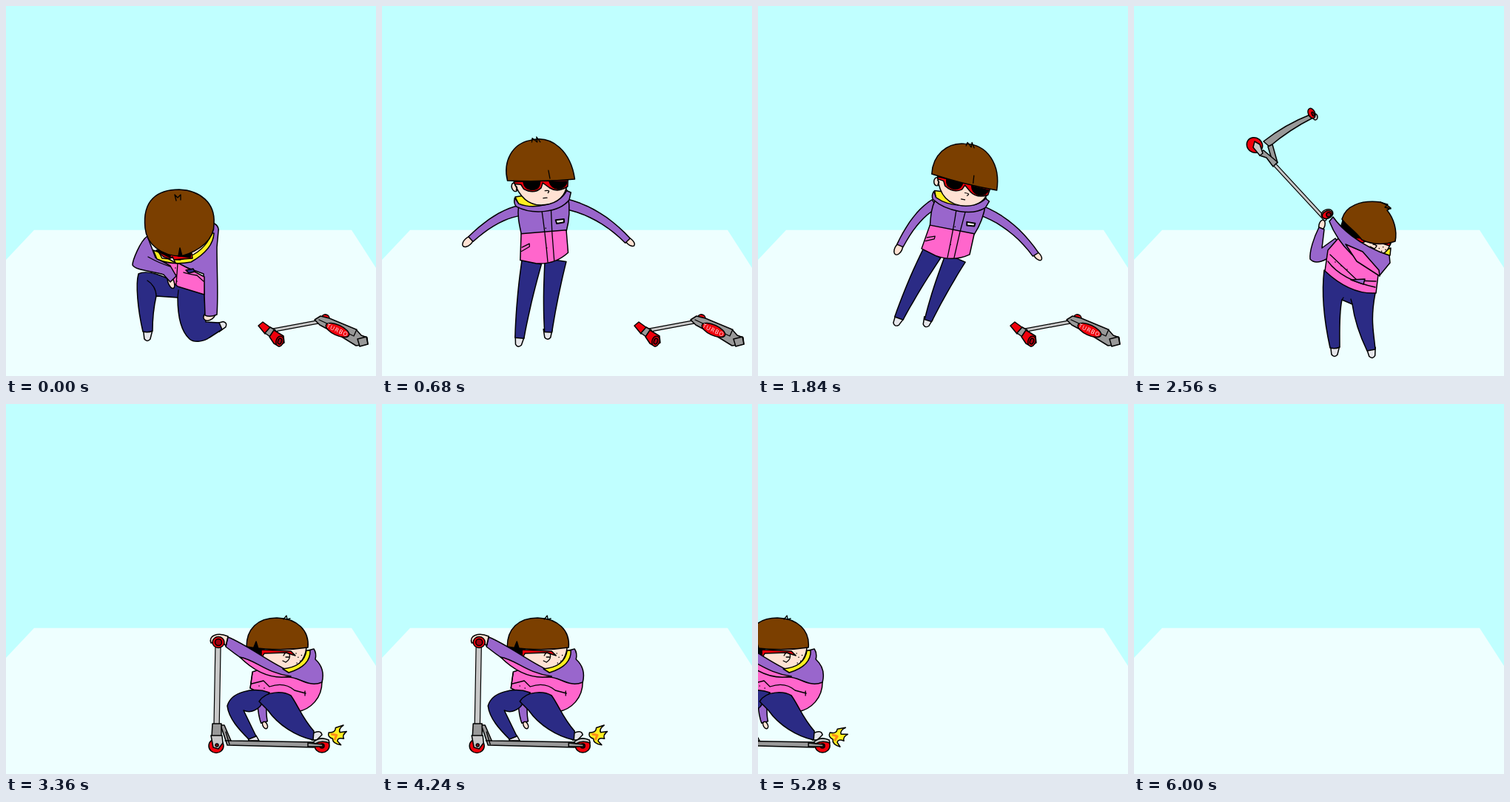
An HTML page for the animation above (6.04 s loop, 500 by 500 pixels).

```html
<!DOCTYPE html>
<html lang="en">
<head>
<meta charset="utf-8">
<style>
html, body { margin: 0; width: 100%; height: 100%; overflow: hidden; background: #c0ffff; }
svg { display: block; width: 100vw; height: 100vh; }
.ink { stroke: #000; stroke-width: 1.5; stroke-linejoin: round; stroke-linecap: round; }
</style>
</head>
<body>
<svg id="stage" viewBox="0 0 500 500"></svg>
<script>
const LOOP = 6040;
const C = {
  hair: '#7b3f00', skin: '#ffe2d3', purple: '#9966cc', pink: '#ff66cc', navy: '#2b2b85', red: '#f0000c',
  dark: '#a00010', grey: '#999', light: '#c8c8c8', shoe: '#e6e6ea', yellow: '#ffef20', black: '#000', orange: '#ff8c18'
};

const shape = (color, d) => `<path fill="${C[color]}" d="${d}"/>`;
const line = (d, color = 'black', width = 1.3) =>
  `<path fill="none" stroke="${C[color]}" stroke-width="${width}" d="${d}"/>`;
const tube = (d, color, width) => line(d, 'black', width + 2.4) + line(d, color, width);
const oval = (color, x, y, rx, ry = rx, turn = 0) =>
  `<ellipse fill="${C[color]}" cx="${x}" cy="${y}" rx="${rx}" ry="${ry}" transform="rotate(${turn} ${x} ${y})"/>`;
const group = (id, ...parts) => `<g id="${id}">${parts.join('')}</g>`;
const shoe = (x, y, turn) =>
  `<g transform="translate(${x} ${y}) rotate(${turn})">${shape('shoe', 'M-6 -2H6L4 9Q0 14 -4 9Z')}</g>`;
const dot = (x, y) => `<circle cx="${x}" cy="${y}" r=".8" stroke="none"/>`;
const range = n => [...Array(n).keys()];

// Tapered limb along a quadratic curve.
function limb(color, [x0, y0], [x1, y1], [x2, y2], startWidth, endWidth) {
  const sides = [[], []];
  for (const i of range(11)) {
    const k = i / 10, u = 1 - k;
    const x = u * u * x0 + 2 * u * k * x1 + k * k * x2;
    const y = u * u * y0 + 2 * u * k * y1 + k * k * y2;
    const dx = u * (x1 - x0) + k * (x2 - x1), dy = u * (y1 - y0) + k * (y2 - y1);
    const half = (startWidth + (endWidth - startWidth) * k) / 2 / Math.hypot(dx, dy);
    sides[0].push([x - dy * half, y + dx * half]);
    sides[1].unshift([x + dy * half, y - dx * half]);
  }
  return shape(color, 'M' + sides.flat().map(p => p.map(v => v.toFixed(1)).join(' ')).join('L') + 'Z');
}
const buttons = (n, x, y, dx, dy) => range(n).map(i => dot(x + i * dx, y + i * dy)).join('');
const freckles = (x, y, w, h) => range(6).map(i => dot(x + w * (i * 0.618 % 1), y + h * i / 5)).join('');

const lying = group('lying',
  oval('red', 432, 421, 5, 4, 20),
  tube('M362 438L421 427', 'light', 3),
  shape('grey', 'M417 424L425 419 437 422 473 437 480 445 488 448 489 457 473 459 452 446 424 431Z'),
  shape('grey', 'M475 450L487 447 489 457 478 460Z'),
  line('M423 424L470 446 474 437'),
  oval('red', 448, 438, 17, 7, 25),
  '<text x="448" y="441" transform="rotate(25 448 438)" fill="#fff" stroke="none" text-anchor="middle" ' +
    'font-family="Open Sans, sans-serif" font-size="8" letter-spacing="1">TURBO</text>',
  shape('red', 'M341 432L347 427 358 435 350 443Z'),
  shape('grey', 'M350 442L357 434 364 438 357 447Z'),
  shape('red', 'M356 447L362 438 375 446 376 455 369 460 362 456Z'),
  oval('red', 370, 453, 5, 7, 18), oval('dark', 370, 453, 2.5, 4, 18));

const kneel = group('kneel',
  shoe(191.5, 441, 4), shoe(287, 434, -115),
  shape('navy', 'M179 362C175 376 178 410 185 440Q192 442 198 439C198 420 200 405 203 392L232 394C232 420 237 440 248 450C255 456 268 453 275 448L292 437 288 428 270 427 268 388 230 376C215 364 190 356 179 362Z'),
  line('M203 392C203 383 198 375 191 371M232 394L233 384'),
  group('kneelTop',
    oval('skin', 275, 418, 9, 6, -35),
    shape('purple', 'M274 293C283 291 288 299 287 304L285 326C285 360 287 390 285 417Q276 421 269 418L267 362 232 349 236 330Z'),
    shape('pink', 'M207 345L234 348 268 366 268 390 232 379 222 370Z'),
    line('M267 372L258 364Q247 362 240 360M232 348L230 376'),
    shape('navy', 'M243 357L253 355 255 359 247 361Z'),
    buttons(3, 229, 354, 1, 9),
    oval('skin', 223, 373, 4, 9, -20),
    shape('purple', 'M191 311C181 318 171 344 171 350C174 357 197 358 213 363L222 373 230 365 222 351 202 340Z'),
    line('M192 339Q208 348 222 352'),
    shape('yellow', 'M199 330L204 342Q225 351 250 346Q280 329 281 307L274 307Q262 334 230 341Z'),
    shape('skin', 'M205 330L211 341 235 343Q263 336 275 314Z'),
    shape('red', 'M203 330L213 339 225 343 252 341 251 334Z'),
    shape('black', 'M204 331L222 340 222 334ZM229 337L249 340 250 333Z'),
    shape('skin', 'M220 342L225 339 229 347Z'),
    shape('hair', 'M188 300C184 262 205 248 234 248C262 249 283 266 281 294C282 315 262 331 237 338C210 338 190 322 188 300Z'),
    shape('black', 'M235 327L238 338 233 338Z'),
    line('M230 263L228 255 232 259 236 255 236 262')));

const stand = group('stand',
  group('armL', oval('skin', 106, 322, 5, 9, 5), limb('purple', [130, 244], [111, 268], [106.5, 317], 14, 9)),
  group('armR', oval('skin', 168, 348, 4, 8, 25), limb('purple', [193, 250], [196, 298], [168.5, 345], 14, 9)),
  shoe(83, 410, 25), shoe(122.5, 411, 18),
  limb('navy', [127, 316], [101, 365], [83, 410], 27, 12),
  limb('navy', [159, 322], [137, 370], [122.5, 413], 29, 10),
  shape('purple', 'M131 238C125 252 125 264 124 277L184 288Q196 268 199 244Z'),
  shape('pink', 'M124 275L184 287 178 317Q156 328 132 319L113 309Z'),
  line('M160 249Q156 280 148 322M173 250Q164 285 157 322M118 298L130 295 131 291 120 293'),
  buttons(3, 164, 251, -6, 26),
  '<path fill="#fff" stroke-width="2" d="M174 270L185 272 184 276 174 275Z"/>',
  shape('yellow', 'M130 225L132 237 150 247 188 248 201 239 199 234Z'),
  shape('purple', 'M129 226Q125 233 128 238C146 255 181 262 199 249L204 240 199 236C187 250 151 250 132 235Z'),
  oval('skin', 133, 212, 4, 6),
  shape('skin', 'M134 205C136 232 148 246 172 247C190 247 200 237 204 222Z'),
  shape('red', 'M134 205L205 222 202 231Q187 236 178 226L171 217 167 223Q155 229 144 218L142 211 134 208Z'),
  shape('black', 'M146 209L168 214Q165 225 154 222Q145 219 146 209ZM180 218L203 224Q200 232 189 231Q180 227 180 218Z'),
  line('M171 228Q179 229 174 232M166 237L171 238M134 210Q138 213 134 216'),
  shape('hair', 'M126 201C127 174 146 155 170 157C202 157 219 188 214 224Q170 216 126 201Z'),
  line('M182 214L183 203M172 160L174 155 179 162 180 155 183 163'));

const raised = group('raised',
  shoe(271.5, 462, 4), shoe(320.5, 464, -8),
  shape('navy', 'M257 357C253 390 258 430 265 462Q272 464 278 461C278 440 277 415 281 397L295 403C298 425 305 445 315 466L326 464C324 440 319 425 326 388Z'),
  line('M281 397L283 394M295 403L293 396'),
  group('raisedTop',
    oval('skin', 254, 296, 4, 7, 15),
    shape('purple', 'M250 299C243 313 237 331 238 342Q245 350 260 342L278 322 272 314 254 327 257 302Z'),
    shape('pink', 'M262 330L276 314 331 355 327 388Q292 390 258 358Z'),
    line('M262 345Q280 370 326 380M265 336L302 371 327 372'),
    shape('purple', 'M293 370L312 369 310 376Z'),
    buttons(3, 272, 346, 8, 5),
    shape('yellow', 'M331 334L347 327 346 337 337 341Z'),
    shape('skin', 'M288 296L300 317 327 337Q342 337 347 320Z'),
    shape('black', 'M283 287L279 300 297 316 311 314 318 306Z'),
    shape('red', 'M286 302L295 313 312 314 316 308 347 321 345 324 318 315 309 320 295 317 284 306Z'),
    shape('hair', 'M281 288C286 270 306 262 333 265L342 269 347 273 342 276C351 287 356 303 353 318Q329 326 308 316C297 302 288 298 281 288Z'),
    line('M333 265L343 268 339 272 347 274M323 322Q331 323 325 328L319 325'),
    freckles(328, 324, 14, 9),
    shape('purple', 'M269 285C278 298 302 323 345 337L346 347 332 364C306 348 278 327 264 291Z'),
    shape('pink', 'M286 322L309 332 331 357 332 365 301 345Z'),
    group('swing',
      tube('M186 210L258 288', 'light', 3),
      oval('red', 163, 188, 11, 10, 35),
      shape('grey', 'M175 183Q204 160 240 146L242 151Q210 167 183 190Z'),
      shape('grey', 'M181 190L187 187 194 212 188 213Z'),
      shape('grey', 'M169 198L175 195 194 211 188 217 179 205 170 202Z'),
      shape('light', 'M163 183L170 187 174 199 170 202 161 191Z'),
      oval('light', 245, 150, 3, 4), oval('red', 240, 145, 4.5, 7, -25), oval('dark', 242, 146, 1.5, 3, -25)),
    oval('skin', 261, 281, 8, 6, -20),
    oval('red', 261, 282, 7, 5, -25), oval('dark', 263, 282, 3)));

const ride = group('ride',
  limb('purple', [346, 404], [346, 420], [349, 430], 12, 9),
  oval('skin', 350, 434, 3, 5, -25),
  shape('shoe', 'M327 450L338 448 342 455 328 455Z'),
  shape('shoe', 'M413 446Q425 439 427 447L420 454 413 454Z'),
  oval('red', 284, 462, 10, 9.5),
  shape('grey', 'M290 434L295 434 304 455 416 457 416 464 299 461Z'),
  line('M296 455L304 455M297 443L302 460'),
  oval('red', 427, 461.5, 10, 9.5), oval('dark', 427, 462, 3),
  shape('grey', 'M408 458L428 460 428 463 408 463Z'),
  shape('light', 'M415 457Q424 449 436 454L437 458Q426 454 418 459Z'),
  tube('M286.5 328L284.5 438', 'light', 6),
  shape('grey', 'M279 432L291 432 291 450 278 450Z'),
  shape('light', 'M277 448L292 448 293 458 287 466 280 464Z'),
  oval('dark', 285, 461, 2),
  shape('pink', 'M333 362L355 355 427 375C427 398 412 412 394 416L330 384Z'),
  shape('navy', 'M299 408C304 389 334 382 356 390L343 409Q332 419 321 414L338 449 328 453C315 440 301 425 299 408Z'),
  shape('navy', 'M342 402C351 387 375 388 385 394C395 408 400 424 416 442L415 454C392 449 368 434 354 414Z'),
  line('M332 378L348 374 356 382Q376 375 390 387L405 391M404 388V394M333 364L330 384'),
  buttons(2, 342, 381, 7, 3),
  shape('skin', 'M343 329L347 347Q362 358 378 358Q403 355 406 329Z'),
  shape('black', 'M327 328L349 330 347 339 341 344 329 340Z'),
  shape('red', 'M345 332L385 334 391 340 378 336 349 337 345 344Z'),
  line('M375 340Q378 333 383 338Q385 345 378 349L374 347M378 342L382 342'),
  freckles(392, 337, 12, 13),
  shape('hair', 'M325 328C325 304 340 289 366 289C394 290 410 306 408 329Q369 335 325 328Z'),
  shape('black', 'M334 331L338 321 341 331Z'),
  line('M375 291L379 286 380 291 384 290'),
  shape('purple', 'M300 315C325 325 355 348 377 358C396 360 410 348 408 333L416 331Q420 337 418 345C428 354 430 364 427 376C408 384 396 368 380 369C352 368 325 350 297 328Z'),
  shape('pink', 'M316 342C338 346 350 363 385 368C358 373 336 362 316 342Z'),
  shape('yellow', 'M406 333L411 333Q412 354 382 363L374 358Q403 355 406 333Z'),
  shape('skin', 'M277 323C273 313 286 308 300 314L297 327 292 320Z'),
  oval('red', 287, 322, 8, 7.5), oval('dark', 287, 322, 4.5),
  group('flame',
    shape('yellow', 'M437 444Q446 446 447 439L458 437Q450 441 452 446L461 446Q454 450 456 455Q448 452 447 457L451 463Q440 460 441 453Q434 450 437 444Z'),
    line('M441 447L447 449 444 454', 'orange', 3)));

const stage = document.getElementById('stage');
stage.innerHTML = '<path fill="#c0ffff" d="M0 0H500V500H0Z"/><path fill="#eeffff" d="M0 343L38 302.7H467L500 354V500H0Z"/>' +
  `<g class="ink">${lying}${kneel}${stand}${raised}${ride}</g>`;
const el = Object.fromEntries([...stage.querySelectorAll('[id]')].map(node => [node.id, node]));

const progress = (t, from, to) => Math.min(1, Math.max(0, (t - from) / (to - from)));
const eased = (t, from, to) => (1 - Math.cos(Math.PI * progress(t, from, to))) / 2;
const arc = k => Math.sin(Math.PI * k);
const show = (name, on) => el[name].setAttribute('display', on ? 'inline' : 'none');
const move = (name, value) => el[name].setAttribute('transform', value);

function draw(time) {
  // The acting is held on 80 ms steps, the ride on 40 ms steps.
  const t = time < 2400 ? Math.max(0, Math.floor((time - 40) / 80) * 80 + 40) : Math.floor(time / 40) * 40;
  show('lying', t < 2120);
  show('kneel', t < 280);
  show('stand', t >= 280 && t < 2040);
  show('raised', t >= 2040 && t < 2960);
  show('ride', t >= 2960 && t < 6000);
  show('swing', t >= 2120);
  show('flame', t >= 3360);

  const stretch = 1 + 0.18 * progress(t, 40, 280);
  move('kneelTop', `translate(0 385) scale(1 ${stretch}) translate(0 -385)`);

  const rise = eased(t, 200, 680), leap = eased(t, 760, 1320), dash = eased(t, 1400, 1960);
  const x = 222 - 77 * leap + 133 * dash;
  const y = 374 - 24 * rise - 25 * leap + 60 * dash - 55 * arc(dash);
  const turn = -16 * (1 - leap) - 5 * dash + 8 * arc(dash);
  const height = 0.78 + 0.22 * rise - 0.08 * dash;
  const spread = 58 * rise * (1 - leap) + 35 * arc(dash);
  move('stand', `translate(${x} ${y}) scale(1 ${height}) rotate(${turn}) translate(-145 -325)`);
  move('armL', `rotate(${spread} 130 245)`);
  move('armR', `rotate(${-spread - 55 * dash} 195 252)`);

  const angle = 112 * (1 - eased(t, 2120, 2400)) + 150 * eased(t, 2600, 2920);
  move('swing', `rotate(${angle} 262 283)`);
  move('raisedTop', `rotate(${angle * 0.1} 290 385)`);

  const hop = 54 * arc(progress(t, 2920, 3320));
  move('ride', `translate(${-0.177 * Math.max(0, t - 3360)} ${-hop})`);
  move('flame', `translate(436 450) rotate(${8 * Math.sin(t / 20)}) translate(-436 -450)`);
}

function tick(now) {
  draw(now % LOOP);
  requestAnimationFrame(tick);
}
draw(0);
requestAnimationFrame(tick);
</script>
</body>
</html>
```
